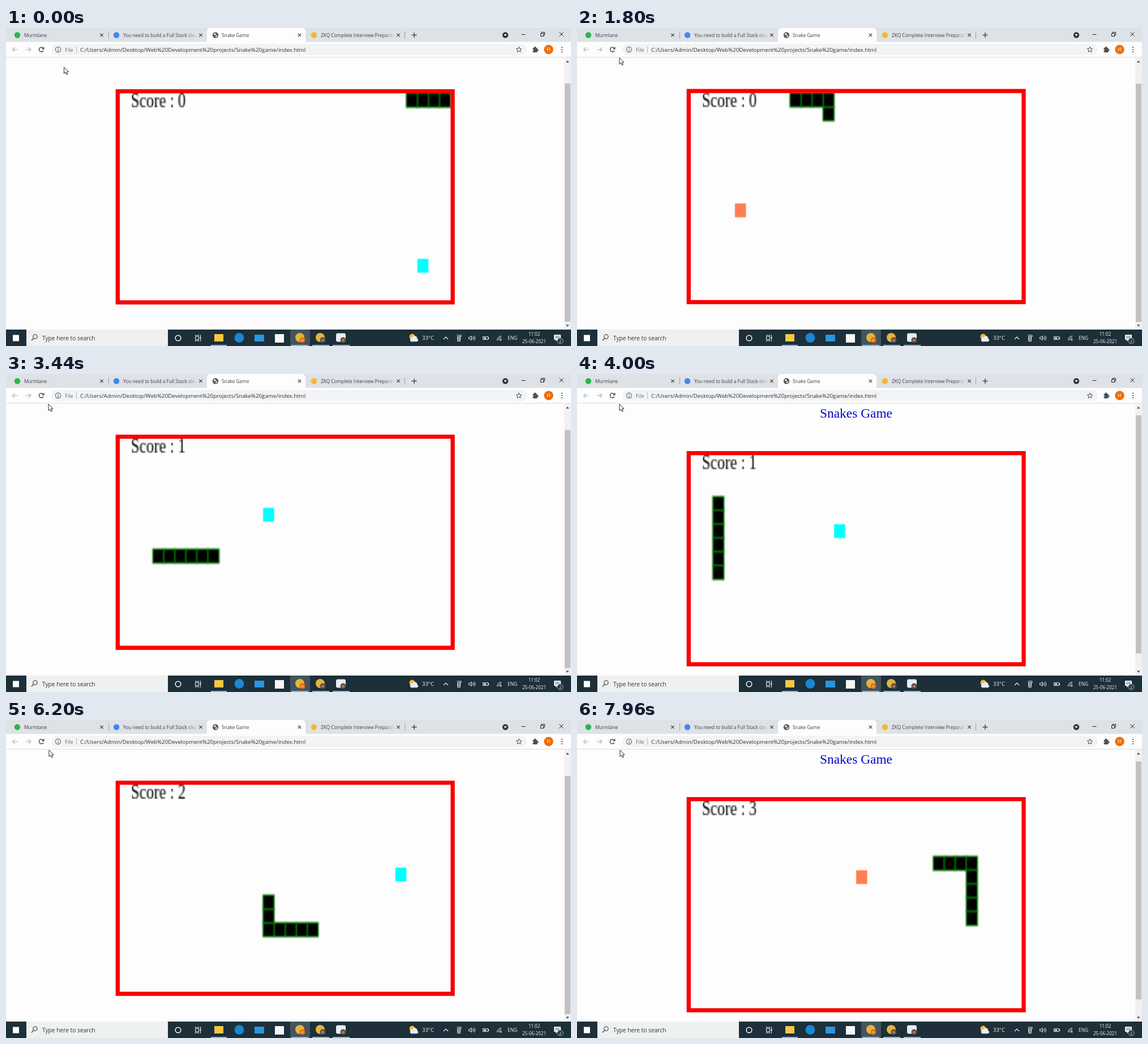
Write an HTML page with a canvas that moves like this. It is 998 px wide and 561 px high and loops after 8 s.

```html
<!DOCTYPE html>
<html lang="en">
<head>
<meta charset="utf-8">
<title>Snake Game</title>
<style>
html, body { margin: 0; width: 100%; height: 100%; overflow: hidden; background: #fdfdfd; }
canvas { display: block; }
</style>
</head>
<body>
<canvas id="stage" width="998" height="561"></canvas>
<script>
const LOOP = 8000, STEP = 101, GAME_START = 843, RELOAD = 760;
const PAGE = '#fdfdfd', INK = '#3c4043', SANS = '"Open Sans", "Noto Sans", sans-serif';
const ctx = document.getElementById('stage').getContext('2d');

// The board is a 300 x 150 bitmap stretched over a larger box.
const board = document.createElement('canvas');
board.width = 300;
board.height = 150;
const pen = board.getContext('2d');

// Corners of the snake's way over the grid
const corners = [[0, 0], [12, 0], [12, 8], [2, 8], [2, 3], [13, 3], [13, 10], [25, 10], [25, 4], [20, 4]];
const path = [corners[0]];
for (let i = 1; i < corners.length; i++) {
  const [x1, y1] = corners[i];
  let [x, y] = corners[i - 1];
  while (x !== x1 || y !== y1) {
    x += Math.sign(x1 - x);
    y += Math.sign(y1 - y);
    path.push([x, y]);
  }
}
const foods = [
  { x: 4, y: 8, color: 'coral' },
  { x: 13, y: 5, color: 'cyan' },
  { x: 25, y: 6, color: 'cyan' },
  { x: 15, y: 5, color: 'coral' }
];
const eatenAt = foods.map(f => path.findIndex(([x, y]) => x === f.x && y === f.y)).slice(0, 3);

// Arrow keys scroll the page: [time, border top, duration]
const scrolls = [[RELOAD, 109, 1], [1700, 107, 150], [3500, 136, 150], [5025, 107, 150], [7040, 136, 150]];
const pointer = [[0, 102.5, 69], [400, 63, 38], [850, 63, 38], [1100, 75, 52], [2500, 75, 53], [4300, 75, 53], [5000, 76, 53], [LOOP, 76, 53]];

const clamp = v => Math.max(0, Math.min(1, v));
const smooth = v => v * v * (3 - 2 * v);

function borderTop(t) {
  let y = 108;
  for (const [at, to, ms] of scrolls) y += (to - y) * smooth(clamp((t - at) / ms));
  return y;
}

function pointerAt(t) {
  const i = Math.max(1, pointer.findIndex(p => p[0] > t));
  const [t0, x0, y0] = pointer[i - 1], [t1, x1, y1] = pointer[i];
  const k = smooth((t - t0) / (t1 - t0));
  return [x0 + (x1 - x0) * k, y0 + (y1 - y0) * k];
}

function rect(x, y, w, h, color) {
  ctx.fillStyle = color;
  ctx.fillRect(x, y, w, h);
}

function round(x, y, w, h, r, color) {
  ctx.fillStyle = color;
  ctx.beginPath();
  ctx.roundRect(x, y, w, h, r);
  ctx.fill();
}

function disc(x, y, r, color) {
  ctx.fillStyle = color;
  ctx.beginPath();
  ctx.arc(x, y, r, 0, 7);
  ctx.fill();
}

function ring(x, y, r, color, width = 1, from = 0, to = 7) {
  ctx.strokeStyle = color;
  ctx.lineWidth = width;
  ctx.beginPath();
  ctx.arc(x, y, r, from, to);
  ctx.stroke();
}

function trace(points) {
  ctx.beginPath();
  points.forEach(([x, y], i) => i ? ctx.lineTo(x, y) : ctx.moveTo(x, y));
}

function line(color, width, ...points) {
  trace(points);
  ctx.strokeStyle = color;
  ctx.lineWidth = width;
  ctx.stroke();
}

function fill(color, ...points) {
  trace(points);
  ctx.fillStyle = color;
  ctx.fill();
}

function text(s, x, y, size, color = INK, align = 'left', font = SANS) {
  ctx.font = `${size}px ${font}`;
  ctx.fillStyle = color;
  ctx.textAlign = align;
  ctx.fillText(s, x, y);
}

function cross(x, y, r, color, width) {
  line(color, width, [x - r, y - r], [x + r, y + r]);
  line(color, width, [x - r, y + r], [x + r, y - r]);
}

function drawBoard(t) {
  pen.clearRect(0, 0, 300, 150);
  let body, food, score = 0;
  if (t < RELOAD) {
    body = [30, 29, 28, 27, 26].map(x => [x, 0]);
    food = { x: 27, y: 12, color: 'cyan' };
  } else if (t >= GAME_START) {
    const head = 4 + Math.floor((t - GAME_START) / STEP);
    score = eatenAt.filter(i => i <= head).length;
    body = path.slice(head - 4 - score, head + 1).reverse();
    food = foods[score];
  } else return;

  pen.lineWidth = 1;
  pen.strokeStyle = 'green';
  for (const [x, y] of body) {
    pen.fillStyle = 'black';
    pen.fillRect(x * 10, y * 10, 10, 10);
    pen.strokeRect(x * 10, y * 10, 10, 10);
  }
  pen.fillStyle = food.color;
  pen.fillRect(food.x * 10, food.y * 10, 10, 10);
  pen.fillStyle = 'black';
  pen.font = '14px "Liberation Serif", serif';
  pen.fillText('Score : ' + score, 10, 10);
}

function drawPage(t) {
  const top = borderTop(t);
  rect(0, 52, 998, 480, PAGE);
  text('Snakes Game', 493, top - 58.7, 23.4, '#0909c8', 'center', '"Liberation Serif", serif');
  ctx.strokeStyle = '#f80000';
  ctx.lineWidth = 7.3;
  ctx.strokeRect(197.3, top + 3.65, 591.7, 372.4);
  drawBoard(t);
  ctx.drawImage(board, 201, top + 7.3, 584, 365);

  rect(986, 52, 12, 480, '#f1f1f1');
  rect(987, 98 - (top - 108) * 0.893, 10, 420, '#c1c1c1');
  fill('#505050', [989, 61], [994.6, 61], [991.8, 57.6]);
  fill('#505050', [989, 523.5], [994.6, 523.5], [991.8, 527]);
}

function fadedText(s, x, y, end) {
  const g = ctx.createLinearGradient(end - 18, 0, end, 0);
  g.addColorStop(0, INK);
  g.addColorStop(1, 'rgba(60,64,67,0)');
  text(s, x, y, 8.3, g);
}

function globe(x, y) {
  disc(x, y, 5.2, '#55595e');
  fill('#f4f4f4', [x - 3.5, y - 2], [x - 0.5, y - 3.5], [x + 1, y - 1], [x - 1, y + 0.5]);
  fill('#f4f4f4', [x + 0.5, y + 1], [x + 3.6, y], [x + 2, y + 3.4], [x, y + 3.6]);
}

function drawTabs() {
  rect(0, 0, 998, 25, '#dee1e6');
  round(355, 0, 174, 30, 6, PAGE);
  disc(20, 12.5, 5.2, '#25b84c');
  fadedText('Murmlane', 32, 15.5, 160);
  disc(195, 12.5, 5.2, '#4285f4');
  fadedText('You need to build a Full Stack clean', 207, 15.5, 338);
  globe(370, 12.5);
  text('Snake Game', 381, 15.5, 8.3);
  disc(544, 12.5, 5.2, '#f4b92c');
  fadedText('ZKQ Complete Interview Preparation', 556, 15.5, 687);
  for (const x of [169, 344, 518.5, 693]) cross(x, 12.5, 2.7, INK, 1.2);
  for (const x of [181, 704]) rect(x, 6, 1, 13, '#9a9ea3');
  line(INK, 1.4, [716.5, 12.5], [725.5, 12.5]);
  line(INK, 1.4, [721, 8], [721, 17]);

  disc(882, 12.5, 5.2, '#35363a');
  fill('#fff', [879.3, 11], [884.7, 11], [882, 14.5]);
  line('#222', 1, [910.5, 11.5], [917.5, 11.5]);
  ctx.strokeStyle = '#222';
  ctx.strokeRect(944.5, 9.5, 5, 5);
  line('#222', 1, [946, 9], [946, 7.5], [951.5, 7.5], [951.5, 12.5], [950, 12.5]);
  cross(981, 11, 3.6, '#222', 1);
}

function arrow(x, y, dir, color) {
  line(color, 1.3, [x - 4.5, y], [x + 4.5, y]);
  line(color, 1.3, [x + dir * 0.5, y - 4], [x + dir * 4.5, y], [x + dir * 0.5, y + 4]);
}

function drawToolbar() {
  rect(0, 24.5, 998, 27.5, PAGE);
  rect(0, 51, 998, 1, '#d9dbde');
  arrow(16, 38, -1, '#b9bbbe');
  arrow(39.5, 38, 1, '#b9bbbe');
  ring(62.5, 38, 4, INK, 1.4, 0.5, 5.5);
  fill(INK, [67.5, 33], [67.5, 37.6], [63, 37.6]);

  round(80, 28, 840, 20, 10, '#f1f3f4');
  ring(92, 38, 4.6, '#5f6368', 1.1);
  rect(91.4, 37.4, 1.2, 3.4, '#5f6368');
  rect(91.4, 35.2, 1.2, 1.2, '#5f6368');
  text('File', 104, 41.5, 9.3, '#6b6f74');
  rect(124, 32, 1, 12, '#b5b8bb');
  text('C:/Users/Admin/Desktop/Web%20Development%20projects/Snake%20game/index.html', 131, 41.5, 9.72, '#303236');

  const star = [];
  for (let i = 0; i <= 10; i++) {
    const a = i * Math.PI / 5 - Math.PI / 2, r = i % 2 ? 2.2 : 5;
    star.push([906 + r * Math.cos(a), 38.3 + r * Math.sin(a)]);
  }
  line('#4a4d51', 1, ...star);
  round(930.5, 35, 8, 8, 1, '#4d5156');
  disc(934.5, 34.6, 1.8, '#4d5156');
  disc(938.8, 39, 1.8, '#4d5156');
  disc(930.6, 39, 1.3, PAGE);
  disc(958.5, 38, 8.2, '#ef6c00');
  text('H', 958.5, 41.2, 8.6, '#fff', 'center');
  for (const y of [34, 38, 42]) disc(982, y, 1.1, INK);
}

function badge(x, y, color) {
  disc(x, y, 5, color);
  text('H', x, y + 2.3, 6, '#fff', 'center');
}

function drawTray() {
  const white = '#f3f5f6';
  disc(717.5, 544.5, 5, '#f8b83a');
  disc(717.5, 549.5, 3.7, '#e6edf4');
  disc(722, 547.5, 4.3, '#e6edf4');
  round(714, 548, 14, 5.2, 2.6, '#e6edf4');
  text('33°C', 735, 550.3, 9.5, white);
  line(white, 1.2, [773, 549], [777, 545], [781, 549]);

  ctx.strokeStyle = white;
  ctx.lineWidth = 1;
  ctx.strokeRect(797.5, 544.5, 5, 6);
  ring(800, 547.5, 1.3, white);
  line(white, 1, [796.5, 542], [804, 542], [804, 545]);
  line(white, 1, [797, 552.5], [803, 552.5]);

  line(white, 1, [817.5, 545.5], [819.5, 545.5], [822, 543], [822, 551], [819.5, 548.5], [817.5, 548.5], [817.5, 545.5]);
  for (const r of [2, 4.3, 6.6]) ring(822, 547, r, white, 0.9, -0.75, 0.75);
  ctx.strokeRect(842.5, 544.5, 9, 5);
  rect(844, 546, 4, 2.5, white);
  rect(852, 546, 1.2, 2.5, white);
  for (const r of [2.5, 5, 7.5]) ring(875, 551, r, white, 1, Math.PI, Math.PI * 1.5);
  disc(874.3, 550.5, 1.1, white);
  text('ENG', 886, 550, 8.4, white);
  text('11:02', 933, 542.5, 8.05, white, 'center');
  text('25-06-2021', 933, 556, 8.05, white, 'center');
  round(968, 541, 12, 9, 1, white);
  fill(white, [971, 549], [975, 549], [971, 553]);
  for (const y of [543.5, 546]) rect(970, y, 8, 0.8, '#26363f');
  disc(979, 552, 5, '#1d2f39');
  ring(979, 552, 5, '#cdd3d7', 0.8);
  text('2', 979, 554.7, 7, white, 'center');
}

function drawTaskbar() {
  rect(0, 532, 998, 29, '#1d2f39');
  rect(12, 541.5, 11, 11, '#fff');
  rect(36, 532, 250, 29, '#eff0f0');
  ring(51.5, 544.5, 3.7, '#333', 1.1);
  line('#333', 1.2, [49, 547.2], [45, 551.5]);
  text('Type here to search', 64, 550.5, 10.23, '#333');

  ring(304, 547, 4.8, '#fff', 1.5);
  ctx.strokeStyle = '#e8ecee';
  ctx.lineWidth = 1;
  ctx.strokeRect(334.5, 544.5, 6, 5);
  line('#e8ecee', 1, [334.5, 541], [334.5, 542.5], [340.5, 542.5], [340.5, 541]);
  line('#e8ecee', 1, [334.5, 553], [334.5, 551.5], [340.5, 551.5], [340.5, 553]);
  line('#e8ecee', 1, [343.5, 541], [343.5, 553]);
  rect(342.5, 545, 2, 3, '#e8ecee');

  rect(502, 532, 35, 29, '#43545d');
  rect(368, 540, 16, 13, '#f6c744');
  disc(412, 546.5, 8.4, '#1c86d1');
  rect(439, 541, 17, 12, '#2a95e0');
  rect(475, 540, 16, 15, '#f5f6f6');
  disc(519, 546, 8, '#e2b53c');
  badge(523.5, 550.5, '#ef6c00');
  disc(555, 546, 8, '#e2b53c');
  badge(559.5, 550.5, '#6d4c41');
  round(583, 538.5, 17, 15, 3, '#e9eef2');
  badge(595.5, 550.5, '#6d4c41');
  for (const x of [362, 504, 541, 577]) rect(x, 559, x === 362 ? 28 : 30, 2, '#76b9ed');
  drawTray();
}

function drawPointer(t) {
  const [x, y] = pointerAt(t);
  const shape = [[0, 0], [0, 11.5], [2.7, 9], [4.6, 13.2], [6.4, 12.4], [4.6, 8.4], [8, 8.2], [0, 0]]
    .map(([dx, dy]) => [x + dx, y + dy]);
  fill('#fff', ...shape);
  line('#111', 0.9, ...shape);
}

function frame() {
  const t = Math.floor(performance.now() % LOOP / 40) * 40;
  drawPage(t);
  drawTabs();
  drawToolbar();
  drawTaskbar();
  drawPointer(t);
  requestAnimationFrame(frame);
}
frame();
</script>
</body>
</html>
```
